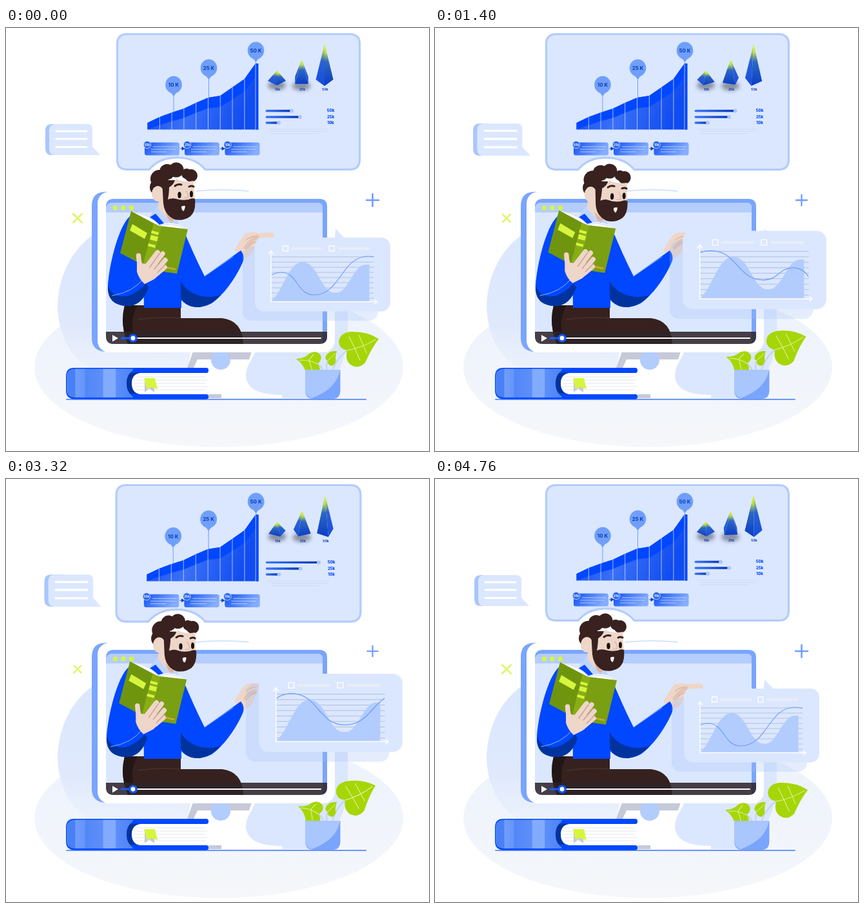
Recreate the animation shown at these times as an HTML page. Size 656 by 656 pixels, loop 4800 ms.

```html
<!DOCTYPE html>
<html lang="en">
<head>
<meta charset="utf-8">
<title>Online lesson</title>
<style>
html, body { margin: 0; width: 100%; height: 100%; overflow: hidden; background: #fff; }
svg { display: block; width: 100vw; height: 100vh; }
text { font-family: Inter, Roboto, sans-serif; font-weight: 700; text-anchor: middle; fill: #0a3cb4; }
.ln { fill: none; stroke-linecap: round; stroke-linejoin: round; }
.blue { fill: #0047ff; }
.navy { fill: #00339e; }
.sky { fill: #7aa5fd; }
.pale { fill: #dbe7ff; }
.skin { fill: #eed6c8; }
.hair { fill: #38211f; }
.lime { fill: #d6f63c; }
.leaf { fill: #a6d608; }
</style>
</head>
<body>
<svg viewBox="0 0 656 656" xmlns="http://www.w3.org/2000/svg">
<defs>
  <linearGradient id="ground" x2="0" y2="1"><stop stop-color="#ecf2fd"/><stop offset="1" stop-color="#f5f7fa"/></linearGradient>
  <linearGradient id="blob" x2="0" y2="1"><stop stop-color="#dbe7ff"/><stop offset=".65" stop-color="#e0e9fc"/><stop offset="1" stop-color="#eef3fc"/></linearGradient>
  <linearGradient id="area" x2="1" y2=".2"><stop stop-color="#0b46ee"/><stop offset=".5" stop-color="#3a70f6"/><stop offset="1" stop-color="#104cf0"/></linearGradient>
  <linearGradient id="step" x2="1" y2=".3"><stop stop-color="#0f50f2"/><stop offset="1" stop-color="#86aefd"/></linearGradient>
  <linearGradient id="bar"><stop stop-color="#3c78fb"/><stop offset="1" stop-color="#0636b8"/></linearGradient>
  <linearGradient id="faceA" x2="0" y2="1"><stop stop-color="#e2ff2c"/><stop offset=".2" stop-color="#bfe04a"/><stop offset=".42" stop-color="#2c68c0"/><stop offset="1" stop-color="#0b3cc8"/></linearGradient>
  <linearGradient id="faceB" x2="0" y2="1"><stop stop-color="#d8f834"/><stop offset=".18" stop-color="#a9cc58"/><stop offset=".4" stop-color="#2b62d4"/><stop offset="1" stop-color="#164cdc"/></linearGradient>
  <linearGradient id="spine"><stop stop-color="#4a80f6"/><stop offset=".12" stop-color="#4a80f6"/><stop offset=".13" stop-color="#6f9efc"/><stop offset=".26" stop-color="#6595fa"/><stop offset=".27" stop-color="#5387f8"/><stop offset=".52" stop-color="#5c8ff9"/><stop offset=".53" stop-color="#82abfe"/><stop offset=".7" stop-color="#82abfe"/><stop offset=".71" stop-color="#5c8ff9"/><stop offset="1" stop-color="#4a80f6"/></linearGradient>
  <filter id="soft" x="-60%" y="-60%" width="220%" height="220%"><feGaussianBlur stdDeviation="3.4"/></filter>
  <clipPath id="screen"><path d="M155 200H498V478Q498 490 486 490H167Q155 490 155 478Z"/></clipPath>
  <clipPath id="plot"><path d="M411 340H570V426H411Z"/></clipPath>
</defs>

<ellipse cx="330" cy="526" rx="286" ry="124" fill="url(#ground)"/>
<path fill="url(#blob)" d="M150 312C108 332 80 380 80 434C82 482 104 520 150 540H300V312Z"/>
<path class="pale" d="M385 500C381 516 372 522 372 540C374 562 396 569 428 569V574H470C505 562 530 520 530 470V331L511 311L500 440Z"/>

<!-- monitor -->
<path fill="#fff" d="M286 503H386C380 518 372 524 372 540C374 562 396 569 428 569V574H312V527H282Z"/>
<path fill="#c6c9d8" d="M290 502H381L377 514H297L291 527H281ZM314 568H334V574H314Z"/>
<circle cx="333" cy="515" r="15" fill="#b2ccfc"/>
<path class="sky" d="M155 254H175V502H153Q133 500 133 481V276Q133 254 155 254Z"/>
<rect x="142" y="254" width="368" height="249" rx="18" fill="#fff"/>
<path class="ln" stroke="#cbdcfd" stroke-width="1.500" d="M295 253Q338 249 376 253"/>
<path class="sky" d="M167 265H486Q498 265 498 277V478Q498 490 486 490H167Q155 490 155 478V277Q155 265 167 265Z"/>
<path class="pale" d="M165 271H483Q491 271 491 279V490H167Q155 490 155 478V281Q155 271 165 271Z"/>
<path fill="#b4cdfd" d="M165 271H483Q491 271 491 279V286H155V281Q155 271 165 271Z"/>
<g class="lime"><circle cx="169.500" cy="279" r="3.700"/><circle cx="182" cy="279" r="3.700"/><circle cx="194.500" cy="279" r="3.700"/></g>

<!-- statistics panel -->
<g id="panel">
  <path class="pale" stroke="#b2ccfc" stroke-width="3.200" d="M188 9.500H533Q548.500 9.500 548.500 25V204Q548.500 219.500 533 219.500H309Q294 201 265 201Q237 201 222 219.500H188Q172.500 219.500 172.500 204V25Q172.500 9.500 188 9.500Z"/>
  <path fill="#fff" d="M307 224Q294 204.500 265 204.500Q238 204.500 224 224Z"/>
  <g id="chart"></g>
  <g id="steps"></g>
  <g fill="#42454f" opacity=".55" filter="url(#soft)"><ellipse cx="420" cy="89" rx="14" ry="7"/><ellipse cx="458" cy="90" rx="14" ry="7"/></g>
  <g id="pyramids"></g>
  <g id="bars"></g>
  <path class="ln" stroke="#cbd6ec" stroke-width=".8" d="M406 157H501M411 160.500H497M411 164H484"/>
</g>

<!-- chat bubble -->
<g id="chat">
  <path fill="#a9c6fd" d="M71 149H90V197H71Q61 197 61 187V159Q61 149 71 149Z"/>
  <path class="pale" d="M76 149H126Q134 149 134 157V184L146 197H76Q67 197 67 187V159Q67 149 76 149Z"/>
  <path class="ln" stroke="#fff" stroke-width="3.200" d="M78 160H125M78 172H125M78 184.500H125"/>
</g>
<path id="cross" class="ln" style="stroke-linecap:butt" stroke="#e0f573" stroke-width="3" d="M-7.500 -7.500L7.500 7.500M7.500 -7.500L-7.500 7.500"/>
<path id="plus" class="ln" style="stroke-linecap:butt" stroke="#6f9dfb" stroke-width="2.600" d="M-10.500 0H10.500M0 -10.500V10.500"/>

<!-- teacher -->
<g clip-path="url(#screen)">
  <path fill="#36211f" d="M184 430H271V450H335Q368 454 368 492H190Q176 462 184 430Z"/>
  <path fill="#231616" d="M184 430H204Q189 455 202 492H190Q176 462 184 430Z"/>
  <path class="ln" stroke="#4d3a38" d="M204 452Q240 447 271 450"/>
  <path id="hand" class="skin" d="M354 345Q362 330 371 319Q384 314 392 319L389 333Q383 344 381 350Q374 357 367 357Z"/>
  <path id="index" class="ln" stroke="#eed6c8" stroke-width="8"/>
  <path id="thumb" class="ln" stroke="#e3c3b4" stroke-width="6.500"/>
  <path class="ln" stroke="#cfa596" stroke-width="1" d="M372 329Q379 323 386 323M377 338Q381 333 387 332"/>
  <path class="blue" d="M232 291Q266 296 279 322C290 348 300 369 308 385L364 345Q370 352 368 361C358 386 336 416 319 427Q304 435 288 432Q278 429 272 422V434H214L212 300Z"/>
  <path class="navy" d="M271 393Q281 411 304 416Q320 419 333 414Q318 430 300 433Q280 434 271 418Z"/>
  <path class="ln" stroke="#7aa5fd" stroke-width="1" d="M308 385L352 355"/>
</g>
<g id="torso">
  <path class="blue" d="M192 292C174 308 160 368 158 398C157 424 172 432 192 431Q212 428 221 402L236 300Z"/>
  <path class="navy" d="M158 400Q167 421 190 415Q207 409 217 396L221 402Q212 430 190 431C168 431 157 421 158 400Z"/>
  <path class="ln" stroke="#8fb4fe" stroke-width="1" d="M165 415Q197 410 214 388"/>
</g>
<path class="skin" d="M238 262H268L264 299L250 303L234 288Z"/>
<path fill="#d9b3a3" d="M247 285Q256 296 267 296L262 301L252 299Z"/>
<path fill="#c0d5fd" d="M234 277L256 302L264 294L268 304L252 310L224 290Z"/>
<path class="blue" d="M222 294L232 288L246 304L238 310Z"/>
<g id="head">
  <g class="hair"><circle cx="236" cy="247" r="13"/><circle cx="238" cy="234" r="14"/><circle cx="250" cy="223" r="12"/><circle cx="264" cy="220" r="11.500"/><circle cx="280" cy="226" r="8"/><circle cx="287" cy="229" r="10"/></g>
  <path class="skin" d="M246 242Q258 244 264 234Q276 240 291 237L293 270Q275 290 247 275Z"/>
  <ellipse class="skin" cx="235.500" cy="257" rx="9.500" ry="12"/>
  <path class="hair" d="M242 236H262Q260 243 253 247Q253 256 251 266Q258 263 264 265Q272 268 283 266Q289 263 293 265Q295 284 286 292Q275 300 262 297Q246 291 244 272Z"/>
  <path fill="#fff" d="M272 277Q275 275 278 276Q277 283 275 284Q272 282 272 277Z"/>
  <path class="ln" stroke="#d9b3a3" stroke-width="1.200" d="M279 252Q284 259 282 263Q280 265 277 263"/>
  <path class="ln" stroke="#38211f" stroke-width="3" d="M262 245Q266 241.500 272 243M284 246Q288 244 291 246"/>
  <g id="eyes" fill="#19110f"><ellipse cx="269" cy="259" rx="2.700" ry="5"/><ellipse cx="287.500" cy="257.500" rx="2.500" ry="5"/></g>
</g>
<g id="book">
  <path fill="#fff" d="M194 285Q218 286 238 305Q258 298 281 311L278 316L240 320L196 300Z"/>
  <path class="ln" stroke="#c9d3e6" stroke-width="1" d="M199 286Q224 290 238 306Q258 301 279 311"/>
  <path fill="#6f950f" d="M194 284L239 308L222 373L177 349Z"/>
  <path fill="#7a9f12" d="M239 307L282 312L265 381L219 374Z"/>
  <path fill="#89ae14" d="M229 303L241 308L224 374L212 369Z"/>
  <path class="lime" d="M196 304L219 318L215 327L192 314ZM226 314L237 317L236 321L225 318ZM225 321L236 324L234 331L223 328ZM221 334L232 337L231 341L220 338Z"/>
  <path class="ln" stroke="#cda83a" stroke-width="2.500" d="M248 371L262 374"/>
  <path class="ln" stroke="#eed6c8" stroke-width="7.500" d="M205.500 353Q206 368 213 378M218 370L235 348M225 373L243 350M231 377L247 360M233 382L246 371"/>
  <path class="skin" d="M203 362Q210 366 220 366L240 366Q241 382 229 390L215 397Q206 389 203 378Z"/>
  <path class="ln" stroke="#c99c8d" stroke-width="1.300" d="M223 371L238 350M230 374L245 356M235 379L248 366"/>
</g>

<!-- player bar -->
<path fill="#2d2328" fill-opacity=".86" d="M155 471H498V478Q498 490 486 490H167Q155 490 155 478Z"/>
<path fill="#fff" d="M165 476L174 481L165 486.500Z"/>
<path class="ln" stroke="#fff" stroke-width="2.200" d="M203 481H488"/>
<path class="ln" stroke="#1a5cff" stroke-width="3" d="M179 481H192"/>
<circle cx="197" cy="481" r="5" fill="#fff" stroke="#0f55ff" stroke-width="3.200"/>

<!-- chart card -->
<g id="card">
  <rect x="367" y="339" width="210" height="115" rx="14" fill="#9fbdf5" opacity=".27"/>
  <rect class="pale" x="386" y="325" width="210" height="114.500" rx="14"/>
  <path class="ln" stroke="#fff" stroke-width="1.300" d="M429.500 338H437.500V346H429.500ZM501 338H509V346H501Z"/>
  <path class="ln" stroke="#eaedf6" stroke-width="3.500" d="M444 342H489M516 342H562"/>
  <path id="grid" class="ln" stroke="#a3afca" stroke-width=".7"/>
  <path fill="#b2ccfd" d="M411 424C430 408 438 363 460 363C484 363 488 411 511 411C532 411 538 367 558 367H563.500V424Z"/>
  <path id="wave" class="ln" clip-path="url(#plot)" stroke="#6f9dfb" stroke-width="1.200"/>
  <path class="ln" stroke="#fff" stroke-width="1.400" d="M411 347V424.500H574M407.500 350L411 345.500L414.500 350M571.500 421.500L575.500 424.500L571.500 428"/>
</g>

<!-- plant -->
<g id="leafL">
  <path class="ln" stroke="#c3d2e6" stroke-width="2" d="M492 532Q490 525 483 521"/>
  <path class="leaf" d="M450 513Q464 512 470 505Q480 499 487 506Q492 514 483 521Q491 529 482 536Q474 540 465 535Q462 521 450 513Z"/>
  <path class="ln" stroke="#e3f3a4" stroke-width="1" d="M455 515Q471 514 483 521M470 515L477 506M470 515L475 531"/>
</g>
<g id="leafR">
  <path class="ln" stroke="#c3d2e6" stroke-width="2" d="M506 532Q514 510 529 500"/>
  <path class="leaf" d="M578 482Q560 470 534 471Q517 473 516 487Q517 498 529 500Q525 514 534 522Q546 530 557 519Q567 496 578 482Z"/>
  <path class="ln" stroke="#e3f3a4" stroke-width="1" d="M529 500Q552 496 573 483M541 497L532 479M541 497L549 515M554 492L547 476M554 492L559 504"/>
</g>
<path class="ln" stroke="#c3d2e6" stroke-width="2" d="M498 532Q496 522 499 516"/>
<path class="leaf" d="M513 501Q502 500 497 507Q493 514 499 516Q498 523 506 524Q513 520 511 512Q511 506 513 501Z"/>
<path class="ln" stroke="#e3f3a4" stroke-width="1" d="M499 516L510 505"/>
<path class="sky" d="M464 530H518.500V563Q518 575 507 575H476Q465 575 464 563Z"/>
<path fill="#a9c6fd" d="M464 530H518Q513 560 474 574Q465 571 464 563Z"/>

<!-- lying book -->
<path class="ln" stroke="#6a97f8" stroke-width="2" d="M94 576H558"/>
<path class="blue" d="M106 527H310Q314 527 314 531Q314 535 310 535H204V568H310Q314 568 314 572Q314 575.500 310 575.500H106Q93 575 93 562V540Q93 527 106 527Z"/>
<path fill="url(#spine)" d="M106 528.500H202V573H106Q94 572 94 562V540Q94 529.500 106 528.500Z"/>
<path class="navy" d="M204 529Q187 533 187 551Q187 570 204 573H232V529Z"/>
<path class="blue" d="M198 527H310Q314 527 314 531Q314 535 310 535H208Q200 533 194 536ZM194 566L208 568H310Q314 568 314 572Q314 575.500 310 575.500H198Z"/>
<path fill="#fff" d="M208 535H312V568H208Q195 566 195 551Q195 537 208 535Z"/>
<path class="ln" stroke="#e3e6ee" stroke-width="1" d="M203 541H309M200 546H312M199 551H309M200 556H312M202 561H309"/>
<path fill="#c6c9d8" d="M215 543H230V565L222 559L215 565Z"/>
<path class="lime" d="M214 543H231L235 560L225 557L218 559Z"/>
</svg>
<script>
const LOOP = 4800;
const $ = id => document.getElementById(id);
const add = (parent, tag, attrs, label) => {
  const el = document.createElementNS('http://www.w3.org/2000/svg', tag);
  for (const key in attrs) el.setAttribute(key, attrs[key]);
  if (label) el.textContent = label;
  return $(parent).appendChild(el);
};
const set = (id, key, value) => $(id).setAttribute(key, value);
const mix = (a, b, k) => a + (b - a) * k;

// Steps of [time, value], eased between neighbours.
const track = (steps, t) => {
  let i = 1;
  while (i < steps.length - 1 && t > steps[i][0]) i++;
  const [t0, a] = steps[i - 1], [t1, b] = steps[i];
  const k = Math.min(1, Math.max(0, (t - t0) / (t1 - t0)));
  return mix(a, b, (1 - Math.cos(Math.PI * k)) / 2);
};

// Area chart with balloons
const tops = [147, 138, 131, 125, 116, 108, 105, 92, 79, 55];
const xs = tops.map((_, i) => i < 9 ? 219.5 + i * 18.8 : 387);
const line = dy => tops.map((y, i) => `${xs[i]} ${Math.min(157.5, y + dy(i))}`);
add('chart', 'path', { d: `M${line(() => 0).join('L')}H391V157.500H219.500Z`, fill: 'url(#area)' });
add('chart', 'path', { d: `M${[...line(() => 0), ...line(i => 11.5 + i).reverse()].join('L')}Z`, class: 'blue' });
add('chart', 'path', { d: 'M387.500 55H391.500V157.500H387.500Z', class: 'blue' });
add('chart', 'path', { d: tops.map((y, i) => `M${xs[i]} ${y}V157.500`).slice(1).join(''), stroke: '#c9dbff', 'stroke-width': .8 });
[[260, 88, 131, '10 K'], [314.5, 62, 108, '25 K'], [387.5, 35, 55, '50 K']].forEach(([x, y, end, label]) => {
  add('chart', 'path', { d: `M${x} ${y + 17}V${end}`, stroke: '#6f9dfb', 'stroke-width': 1 });
  add('chart', 'path', { d: `M${x - 6} ${y + 10}H${x + 6}L${x} ${y + 18}Z`, fill: '#6f9ffb' });
  add('chart', 'ellipse', { cx: x, cy: y, rx: 12.8, ry: 13.5, fill: '#6f9ffb' });
  add('chart', 'text', { x, y: y + 3, 'font-size': 8 }, label);
});

// Process boxes
[215, 277, 339.5].forEach((x, i) => {
  add('steps', 'rect', { x, y: 177.5, width: 54, height: 20, rx: 3.5, fill: 'url(#step)' });
  add('steps', 'path', { d: `M${x + 13} 184H${x + 50}M${x + 10} 188H${x + 48}M${x + 10} 192H${x + 34}`, stroke: '#c9dbff', 'stroke-width': .8 });
  add('steps', 'circle', { cx: x + 4, cy: 181, r: 5.7, fill: '#2a66ee', stroke: '#dbe7ff', 'stroke-width': .8 });
  add('steps', 'text', { x: x + 4, y: 182.7, 'font-size': 4.5, style: 'fill:#fff' }, ['50k', '25k', '10k'][i]);
  if (i < 2) add('steps', 'path', { d: `M${x + 55} 187H${x + 59}M${x + 58} 184.500L${x + 62} 187L${x + 58} 189.500Z`, stroke: '#0a3cb4', fill: '#0a3cb4', 'stroke-width': .8 });
});

// Turning pyramids: two side faces, then the one nearest the viewer
const pyramids = [
  { x: 420, top: 66, base: 82, r: 14, ry: 7, turn: 0, label: '10k' },
  { x: 458.5, top: 49, base: 81, r: 14.5, ry: 8, turn: 45, label: '25k' },
  { x: 494, top: 25, base: 80, r: 13.5, ry: 10, turn: 0, label: '50k' },
].map(p => {
  p.faces = ['faceB', 'faceB', 'faceA'].map(g => add('pyramids', 'path', { fill: `url(#${g})` }));
  add('pyramids', 'text', { x: p.x + 1, y: 97, 'font-size': 5 }, p.label);
  return p;
});
const turnPyramid = (p, t) => {
  const start = (p.turn + 360 * t / LOOP) % 90;
  const corner = k => {
    const a = (start + 90 * k) * Math.PI / 180;
    return `${p.x + p.r * Math.cos(a)} ${p.base + p.ry * Math.sin(a)}`;
  };
  [-1, 1, 0].forEach((k, i) => p.faces[i].setAttribute('d', `M${p.x} ${p.top}L${corner(k)}L${corner(k + 1)}Z`));
};

// Slider bars
const sliders = [[128.5, 443, '50k'], [138, 456, '25k'], [147, 423, '10k']].map(([y, x, label]) => {
  const bar = add('bars', 'rect', { x: 402.5, y: y - 1.7, width: x - 402.5, height: 3.4, rx: 1.7, fill: 'url(#bar)' });
  const knob = add('bars', 'circle', { cx: x, cy: y, r: 2.9, fill: '#a9c6fd' });
  add('bars', 'text', { x: 503.5, y: y + 1.7, 'font-size': 6, style: 'fill:#0047ff;font-weight:800' }, label);
  return { bar, knob };
});

set('grid', 'd', Array.from({ length: 9 }, (_, i) => `M411 ${355 + i * 8}H570`).join(''));

// Scrolling curve: one period of turning points, repeated
const PERIOD = 416;
const knots = [[146, 354], [224, 400], [306, 354], [383, 397], [427, 379], [477, 414]];
const curve = [-1, 0, 1].flatMap(n => knots.map(([x, y]) => [x + n * PERIOD, y]));
const wavePath = shift => curve.map(([x, y], i) => {
  if (!i) return `M${x + shift} ${y}`;
  const [px, py] = curve[i - 1], mid = (px + x) / 2 + shift;
  return `C${mid} ${py} ${mid} ${y} ${x + shift} ${y}`;
}).join('');

const moves = {
  panel: [[0, 0], [720, .95], [1440, 0], [2160, 1], [2960, 0], [3840, 1.1], [4800, 0]],
  chat: [[0, 0], [480, 1], [960, .7], [1440, 1], [1920, .7], [2700, 1], [3500, .8], [4100, .9], [4760, 0]],
  cross: [[0, 1], [1000, .8], [2000, 1], [3000, .82], [3700, .82], [4800, 1]],
  plus: [[0, 1], [1000, .86], [2000, .94], [3200, .86], [4800, 1]],
  sway: [[0, .85], [850, 0], [2050, 1], [2900, 0], [3400, .1], [4450, 1], [4800, .85]],
  head: [[0, 0], [900, 0], [1320, 1], [2080, 1], [2560, .35], [3960, .35], [4560, 0]],
  lean: [[0, 0], [960, 0], [1360, 1], [3960, 1], [4480, 0]],
  grow: [[0, 0], [960, 0], [1160, 1], [4280, 1], [4500, 0]],
  lift: [[0, 0], [1180, 0], [1720, 1], [3900, 1], [4400, 0]],
  slider: [[0, 0], [600, 0], [2100, 1], [3880, 1], [4560, 0]],
  fingerX: [[0, 412], [320, 412], [760, 407], [920, 407], [1240, 388], [4040, 388], [4560, 412]],
  fingerY: [[0, 321.5], [320, 321.5], [760, 311], [920, 311], [1240, 322], [4040, 322], [4560, 321.5]],
};

function draw(t) {
  const m = {};
  for (const key in moves) m[key] = track(moves[key], t);
  const scaled = (x, y, s) => `translate(${x} ${y}) scale(${s}) translate(${-x} ${-y})`;

  set('panel', 'transform', scaled(361, 8, 1 + .019 * m.panel));
  set('chat', 'transform', scaled(104, 172.5, 1 + .044 * m.chat));
  set('cross', 'transform', `translate(111 295) scale(${m.cross})`);
  set('plus', 'transform', `translate(568.500 267) scale(${m.plus})`);
  set('leafR', 'transform', `rotate(${mix(-6, 1.2, m.sway)} 506 532)`);
  set('leafL', 'transform', `rotate(${mix(9, -2, m.sway)} 492 532)`);

  set('head', 'transform', `translate(${4.5 * m.head} ${1.8 * m.head}) rotate(${2 * m.head} 256 292)`);
  const closed = t >= 1920 && t <= 2080;
  set('eyes', 'transform', closed ? 'translate(0 263) scale(1 .18) translate(0 -258)' : '');
  set('torso', 'transform', `translate(${-2 * m.lean} 0)`);
  set('book', 'transform', `translate(${-1.7 * m.lean} ${-1.2 * m.lean})`);
  set('index', 'd', `M374 327Q386 ${m.fingerY - 1} ${m.fingerX} ${m.fingerY}`);
  set('thumb', 'd', `M372 340Q382 328 ${mix(389, 386, m.lean)} ${mix(324, 330, m.lean)}`);

  const size = 1 + .06 * m.grow;
  set('card', 'transform', `translate(${12.5 * m.lift} ${-19.7 * m.lift}) ${scaled(491, 382, size)}`);
  set('wave', 'd', wavePath(PERIOD * t / LOOP));

  const end = 443 + 41 * m.slider;
  sliders[0].bar.setAttribute('width', end - 402.5);
  sliders[0].knob.setAttribute('cx', end);
  pyramids.forEach(p => turnPyramid(p, t));
}

function tick() {
  const t = performance.now() % LOOP;
  draw(t - t % 40);
  requestAnimationFrame(tick);
}
tick();
</script>
</body>
</html>
```
